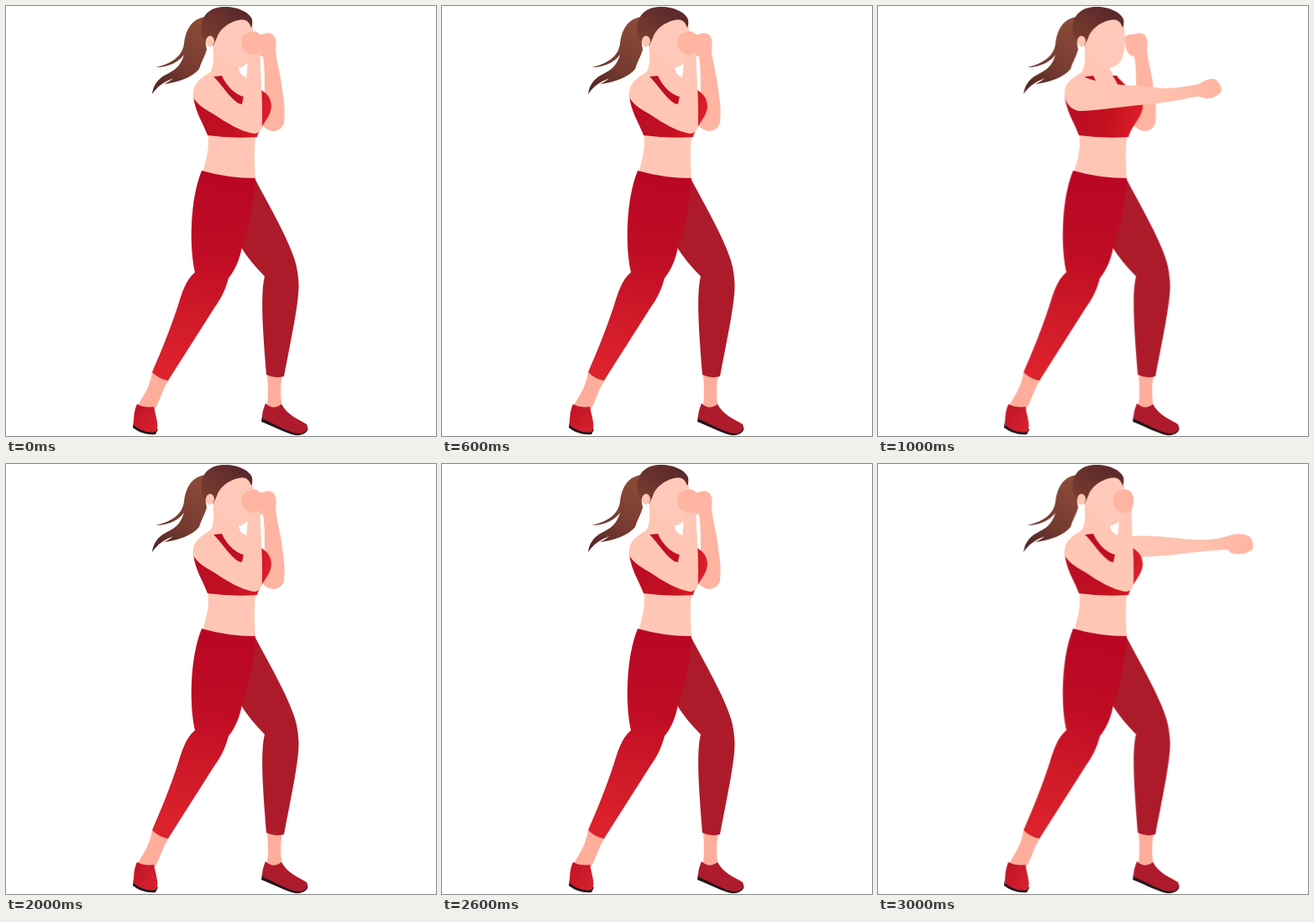
An HTML page for the animation above (4000 ms loop, 512 by 512 pixels).

```html
<!DOCTYPE html>
<html lang="en">
<head>
<meta charset="utf-8">
<title>Boxing workout</title>
<style>
  html, body { margin: 0; width: 100%; height: 100%; overflow: hidden; background: #fff; }
  svg { display: block; width: 100%; height: 100%; }
</style>
</head>
<body>
<svg viewBox="0 0 512 512">
  <defs>
    <linearGradient id="hair" x1="1" y1="0" x2="0" y2="1">
      <stop offset="0" stop-color="#55232a"/><stop offset="1" stop-color="#7d4030"/>
    </linearGradient>
    <linearGradient id="tail" x1=".7" y1="0" x2=".2" y2="1">
      <stop offset="0" stop-color="#8b4a38"/><stop offset=".6" stop-color="#743a30"/><stop offset="1" stop-color="#512423"/>
    </linearGradient>
    <linearGradient id="top" x1="0" y1=".3" x2="1" y2=".5">
      <stop offset="0" stop-color="#b90d27"/><stop offset=".6" stop-color="#c2101f"/><stop offset="1" stop-color="#dd1f2b"/>
    </linearGradient>
    <linearGradient id="leg" x1=".52" y1="0" x2=".45" y2="1">
      <stop offset="0" stop-color="#b90624"/><stop offset=".4" stop-color="#c00d25"/><stop offset=".7" stop-color="#d01a29"/><stop offset="1" stop-color="#dd232d"/>
    </linearGradient>
    <linearGradient id="shoe" x1="0" y1="0" x2="1" y2="1">
      <stop offset="0" stop-color="#be1227"/><stop offset="1" stop-color="#d8232d"/>
    </linearGradient>
    <linearGradient id="rise" x1="0" y1="0" x2="0" y2="1">
      <stop offset="0" stop-color="#ffb5a2"/><stop offset="1" stop-color="#ffb3a1"/>
    </linearGradient>
    <linearGradient id="reach" x1="0" y1="0" x2="1" y2="0">
      <stop offset="0" stop-color="#ffc7b6"/><stop offset=".6" stop-color="#ffc2b0"/><stop offset="1" stop-color="#ffb4a1"/>
    </linearGradient>
  </defs>

  <g id="figure">
    <!-- ponytail -->
    <path fill="url(#tail)" d="M237 13C222 15 214 27 212 45C210 60 197 69 178 73C195 73 206 66 212 58C208 72 200 77 190 82C180 87 175 96 174 105C180 96 187 91 199 86C196 89 192 91 188 93C205 91 222 85 230 75C232 67 237 60 239 52C238 44 235 32 237 13Z"/>

    <!-- rear arm -->
    <g id="rearGuard" fill="url(#rise)">
      <path d="M295 44C292 37 297 33 305 34C311 31 318 32 320 37C323 43 321 48 321 54C323 70 328 86 329 101C332 117 332 128 331 139C329 146 323 149 317 149C309 147 303 142 302 134L308 102C308 85 308 72 306 60C300 60 296 54 295 44Z"/>
    </g>
    <g id="rearJab" fill="url(#reach)">
      <path d="M292 88C310 84 329 86 345 87C364 89 386 92 403 89C411 88 416 86 420 85C427 82 437 83 443 86C447 91 448 97 447 101C441 107 429 109 422 106C419 105 418 102 415 102C397 103 383 105 368 106C350 109 330 110 314 111L296 110Z"/>
    </g>

    <!-- torso, neck and face -->
    <path fill="#ffc6b5" d="M246 44C248 58 248 70 244 78C236 85 222 88 223 108L240 151C243 170 238 184 234 199Q265 208 297 206C296 190 295 174 297 156L308 111L291 88L281 82C278 79 277 76 277 71Z"/>
    <path fill="#ffc9b9" d="M248 36C252 23 268 11 291 14C296 30 297 51 290 65C286 71 280 74 274 73C261 69 253 58 248 44Z"/>
    <path fill="url(#hair)" d="M233 34C230 16 238 2 259 1C274 0 290 7 293 16Q294 22 292 26C289 17 284 15 276 17C264 20 254 28 251 38L247 47C240 46 235 42 233 34Z"/>
    <ellipse cx="243" cy="42" rx="5" ry="6.5" fill="#ffc6b5"/>

    <!-- top -->
    <path fill="url(#top)" d="M248 84L257 83C264 98 275 108 289 109C292 104 297 100 302 99C312 104 316 111 316 120C315 133 304 140 299 156Q270 158 240 154C234 138 225 126 223 107Z"/>

    <!-- legs -->
    <path fill="#ffad9b" d="M174 436L194 445C186 457 184 468 177 481L156 478C162 465 171 456 174 436ZM311 438L329 440C326 454 327 466 329 480L310 480C313 466 312 452 311 438Z"/>
    <path fill="#ad1b2b" d="M296 205C314 239 336 277 344 303C347 313 348 322 348.500 331C349 350 342 385 331 441Q320 444 310 439C307 400 302 345 308 322C297 311 287 299 279 286Z"/>
    <path fill="url(#leg)" d="M233 196Q264 205 297 205C295 236 290 261 281 286C279 299 274 313 265 324C261 338 257 347 249 358L193 446Q182 444 174 436C184 413 196 384 205 356C209 343 214 326 225 317C218 287 219 230 233 196Z"/>

    <!-- shoes -->
    <path fill="#24151b" d="M152 494L151 502C158 508 169 511 178 510L181 504ZM305 488L304 495C317 500 332 508 344 511C354 512 361 507 359 501Z"/>
    <path fill="url(#shoe)" d="M156 474C152 483 152 492 152 499C159 505 169 509 178 507C183 502 179 491 176 477Q165 479 156 474Z"/>
    <path fill="#ae1b2c" d="M309 473C306 481 304 487 306 492C321 498 333 506 347 509C356 510 361 504 358 498C348 492 335 487 328 474Q318 482 309 473Z"/>

    <!-- front arm -->
    <g id="frontGuard">
      <path fill="#ffc6b5" d="M223 109C221 94 232 84 247 84C255 91 263 105 274 114Q277 117 281 117C284 105 288 80 288 55L303 54C302 77 306 105 305 139C305 147 302 152 295 152C279 149 264 140 246 128C235 122 227 116 223 109Z"/>
      <path fill="url(#rise)" d="M281 46C279 39 282 33 289 32C295 28 302 31 304 37C306 43 305 50 302 55C297 60 290 58 287 55C283 54 282 50 281 46Z"/>
    </g>
    <g id="frontJab">
      <path fill="#c2101f" d="M280 83L285 83Q290 91 302 99L289 104Q287 92 280 83Z"/>
      <path fill="url(#reach)" d="M223 108C221 94 231 83 245 84C258 90 274 92 292 94C310 94 325 97 343 98C357 98 370 95 383 93C389 88 396 86 402 87C407 91 410 96 410 101C406 107 398 111 390 110C386 109 383 107 379 108C360 112 342 115 326 117C302 118 269 124 242 125C232 125 225 117 223 108Z"/>
    </g>
  </g>
</svg>
<script>
  const STEP = 1000;

  // one value per second of the loop, held without blending
  const tracks = {
    frontGuard: ['visibility', 'visible', 'hidden', 'visible', 'visible'],
    frontJab:   ['visibility', 'hidden', 'visible', 'hidden', 'hidden'],
    rearGuard:  ['visibility', 'visible', 'visible', 'visible', 'hidden'],
    rearJab:    ['visibility', 'hidden', 'hidden', 'hidden', 'visible'],
    figure:     ['transform', 'translateX(0px)', 'translateX(-0.7px)', 'translateX(0px)', 'translateX(-0.7px)']
  };

  for (const [id, [prop, ...values]] of Object.entries(tracks)) {
    const frames = [...values, values[0]].map((value, i) => ({
      [prop]: value, offset: i / values.length, easing: 'steps(1, end)'
    }));
    const anim = document.getElementById(id).animate(frames, {
      duration: STEP * values.length, iterations: Infinity
    });
    anim.startTime = 0;
  }
</script>
</body>
</html>
```
